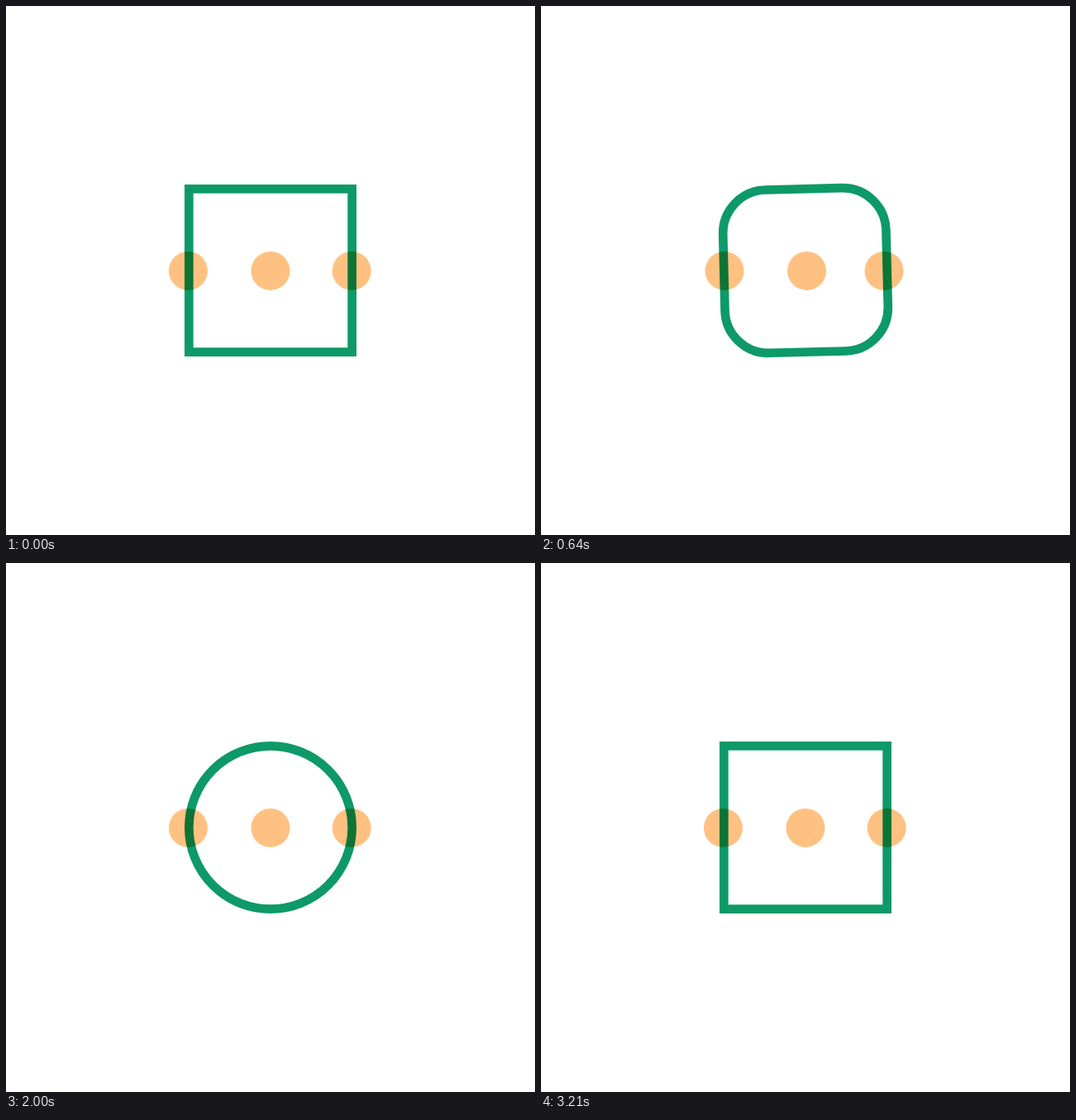
Write an HTML page that moves like this. It is 640 by 640 pixels and loops after 3.57 s.

```html
<!DOCTYPE html>
<html lang="en">
<head>
<meta charset="utf-8">
<title>Loader</title>
<style>
  html, body { margin: 0; height: 100%; overflow: hidden; background: #fff; }
  svg { display: block; width: 100%; height: 100%; background: #fff; }
  circle, rect { mix-blend-mode: multiply; }
</style>
</head>
<body>
<svg viewBox="0 0 640 640">
  <g fill="#ffc182">
    <circle cy="320.4" r="23.5"/>
    <circle cy="320.4" r="23.5"/>
    <circle cy="320.4" r="23.5"/>
  </g>
  <rect x="221.33" y="221.33" width="197.33" height="197.33"
        fill="none" stroke="#0d9968" stroke-width="10.67"/>
</svg>
<script>
const LOOP = 3570, STEPS = 50, PHASE = 30, MID = 9, REACH = 11;
const spots = [220.4, 320, 418.2];
const goals = [2, 0, 1];            // spot each dot moves to
const angles = [0, 90, 180, 0];
const radii = [0, 53.33, 106.67, 0];

const dots = document.querySelectorAll('circle');
const box = document.querySelector('rect');
const mix = (a, b, p) => a + (b - a) * p;

// Slow start and end with a very fast middle, symmetric around MID
function ease(tick) {
  const n = Math.min(Math.abs(tick - MID), REACH);
  if (!n) return 0.5;
  const tail = 0.232 * (Math.exp(-0.34 * n) - Math.exp(-0.34 * REACH));
  return tick < MID ? tail : 1 - tail;
}

function draw(ms) {
  const step = Math.floor((ms + 5) * STEPS / LOOP) % STEPS;
  const tick = Math.floor(step * 25 / 14);
  const k = Math.floor(tick / PHASE);
  const p = step ? ease(tick % PHASE) : 0;

  dots.forEach((dot, i) => dot.setAttribute('cx', mix(spots[i], spots[goals[i]], p)));
  box.setAttribute('rx', mix(radii[k], radii[k + 1], p));
  box.setAttribute('transform', `rotate(${mix(angles[k], angles[k + 1], p)} 320 320)`);
}

let start;
function loop(now) {
  start ??= now;
  draw((now - start) % LOOP);
  requestAnimationFrame(loop);
}
draw(0);
requestAnimationFrame(loop);
</script>
</body>
</html>
```
